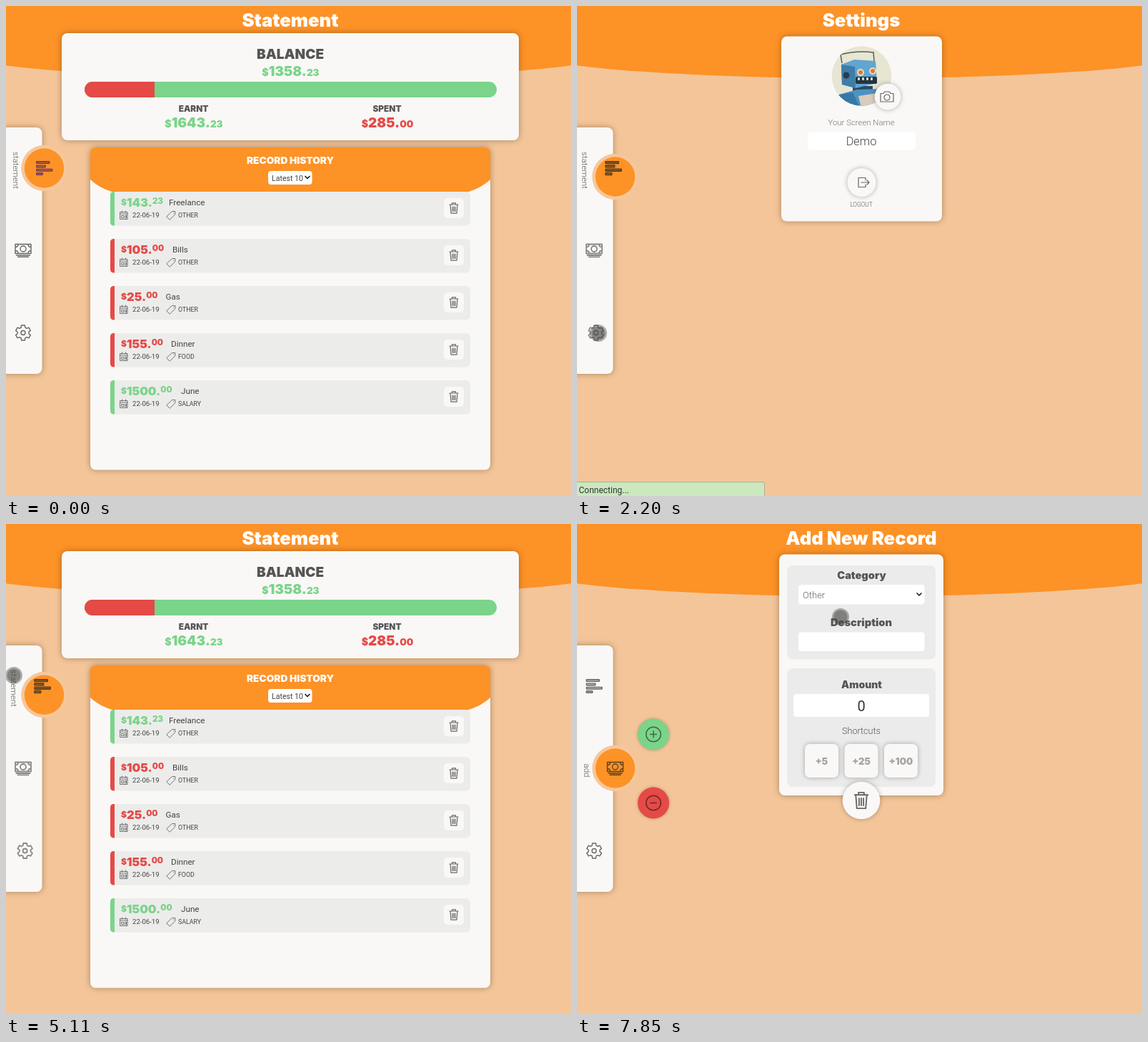
Write an HTML page that moves like this. It is 791 by 686 pixels and loops after 8 s.

```html
<!DOCTYPE html>
<html lang="en">
<head>
<meta charset="utf-8">
<title>Budget tracker</title>
<style>
  html, body { margin: 0; width: 100%; height: 100%; overflow: hidden; background: #f3c599; }
  svg { display: block; width: 791px; height: 686px; font-family: Roboto, "Open Sans", sans-serif; }
  .fat { font-family: Inter, Lato, sans-serif; font-weight: 900; }
  .mid { text-anchor: middle; }
  .thin { font-weight: 300; }
  .card { fill: #f9f8f6; filter: drop-shadow(0 0 4px rgba(80, 50, 20, .45)); }
  .knob { fill: #f9f8f6; filter: drop-shadow(0 0 3px rgba(0, 0, 0, .3)); }
  .line { fill: none; stroke: #666; stroke-width: 1.2; stroke-linejoin: round; stroke-linecap: round; }
</style>
</head>
<body>
<svg id="stage" viewBox="0 0 791 686"></svg>
<script>
const GREEN = '#7ad48a', RED = '#e54a47', ORANGE = '#fd9226', DARK = '#555';
const LOOP = 8000, GLIDE = 663;

const rect = (x, y, w, h, r, fill, cls = '') =>
  `<rect x="${x}" y="${y}" width="${w}" height="${h}" rx="${r}" fill="${fill}" class="${cls}"/>`;
const circle = (x, y, r, fill, cls = '') =>
  `<circle cx="${x}" cy="${y}" r="${r}" fill="${fill}" class="${cls}"/>`;
const text = (x, y, size, fill, str, cls = '') =>
  `<text x="${x}" y="${y}" font-size="${size}" fill="${fill}" class="${cls}">${str}</text>`;
const path = (d, cls = 'line', extra = '') => `<path d="${d}" class="${cls}" ${extra}/>`;
const at = (x, y, body, scale = 1) => `<g transform="translate(${x} ${y}) scale(${scale})">${body}</g>`;
const title = str => text(398, 29, 25.7, '#fff', str, 'fat mid');

// Icons, each centred on 0,0
function gearPath() {
  const pts = [];
  for (let i = 0; i < 6; i++)
    for (const [da, r] of [[-21, 8], [-13, 10.8], [13, 10.8], [21, 8]]) {
      const a = (i * 60 + da) * Math.PI / 180;
      pts.push((r * Math.sin(a)).toFixed(2) + ' ' + (-r * Math.cos(a)).toFixed(2));
    }
  return 'M' + pts.join('L') + 'Z';
}
const ICON = {
  bars: [[-9.2, 18], [-3.9, 12.5], [1.4, 22], [6.7, 8.5]]
    .map(([y, w]) => `<rect x="-10.8" y="${y}" width="${w}" height="2.6" rx=".4" fill="rgba(0,0,0,.25)"/>`).join(''),
  cash: path('M-11-8.5H11V4.5H-11ZM-11-4.5Q-7-4.5-7-8.5M11-4.5Q7-4.5 7-8.5M-11 .5Q-7 .5-7 4.5M11 .5Q7 .5 7 4.5M-9.5 7H9.5M-7.5 9.3H7.5', '') +
    '<circle cy="-2" r="4"/>',
  gear: path(gearPath(), '') + '<circle r="3"/>',
  trash: path('M-6-5H6M-2.5-5V-7.2H2.5V-5M-5-5L-4 7.2H4L5-5M-2-2V4.5M0-2V4.5M2-2V4.5'),
  date: path('M-5-4.5H5V5.5H-5ZM-5-2H5M-2.5-6V-4M2.5-6V-4M-3 .5H0V3.5H-3ZM2 0V4M3.5 0V4', 'line', 'style="stroke-width:.9"'),
  tag: path('M-6 1.5L1.5-5.5H5.8V-1.2L-1.5 6ZM3.5-3.2V-3', 'line', 'style="stroke-width:.9"'),
  camera: path('M-9-4.5H-5L-3.5-7H3.5L5-4.5H9V7H-9Z') + '<circle cy="1" r="4" class="line"/>',
  exit: path('M3-3V-6.5H-7V6.5H3V3M-3 0H8M5-3L8 0L5 3'),
  caret: path('M-3-1.5L0 1.5L3-1.5', 'line', 'style="stroke:#222;stroke-width:1.7"')
};

function amount(x, y, color, whole, cents) {
  return `<text x="${x}" y="${y}" class="fat mid" fill="${color}" font-size="19">` +
    `<tspan font-size="14">$</tspan>${whole}.<tspan font-size="13.5">${cents}</tspan></text>`;
}

function record(i, [whole, cents, name, nameX, kind, color]) {
  const y = 260 + 66 * i;
  return rect(146, y, 504, 47.5, 6, '#ececeb') +
    `<path d="M152 ${y}h-1q-5 0-5 5v37.5q0 5 5 5h1z" fill="${color}"/>` +
    `<text x="161" y="${y + 20.5}" class="fat" fill="${color}" font-size="16.5">` +
    `<tspan font-size="12" dy="-2">$</tspan><tspan dy="2">${whole}.</tspan>` +
    `<tspan font-size="11.5" dy="-4">${cents}</tspan></text>` +
    text(nameX, y + 19.3, 11.7, '#444', name) +
    at(165, y + 33, ICON.date) + text(177, y + 36.3, 9.6, '#444', '22-06-19') +
    at(231, y + 33, ICON.tag) + text(241, y + 36.3, 8.8, '#444', kind) +
    rect(613, y + 9, 28, 28, 5, '#f9f8f6') + at(627, y + 23, ICON.trash);
}

const RECORDS = [
  ['143', '23', 'Freelance', 228, 'OTHER', GREEN],
  ['105', '00', 'Bills', 233, 'OTHER', RED],
  ['25', '00', 'Gas', 223.5, 'OTHER', RED],
  ['155', '00', 'Dinner', 231, 'FOOD', RED],
  ['1500', '00', 'June', 245, 'SALARY', GREEN]
];

const statementPage = title('Statement') +
  rect(78, 38, 640, 150, 8, '', 'card') +
  text(398, 74, 19, DARK, 'BALANCE', 'fat mid') +
  amount(398.5, 98, GREEN, '1358', '23') +
  rect(110, 106, 577, 22, 11, GREEN) +
  path('M208 106H121a11 11 0 0 0 0 22H208Z', '', `fill="${RED}"`) +
  text(262.5, 148, 11.8, DARK, 'EARNT', 'fat mid') + amount(263, 170, GREEN, '1643', '23') +
  text(533.5, 148, 11.8, DARK, 'SPENT', 'fat mid') + amount(534, 170, RED, '285', '00') +
  rect(118, 198, 560, 451.5, 8, '', 'card') +
  path('M118 243V206q0-8 8-8H670q8 0 8 8V243C666 254 650 262 626 264H170C146 262 130 254 118 243Z', '', `fill="${ORANGE}"`) +
  text(398, 221, 13.7, '#fff', 'RECORD HISTORY', 'fat mid') +
  rect(367, 231, 61.5, 19, 4, '#fff') + text(372, 245, 10.6, '#444', 'Latest 10') + at(422, 240, ICON.caret) +
  RECORDS.map((r, i) => record(i, r)).join('');

const robot = '<clipPath id="disc"><circle cx="398.5" cy="98" r="41.8"/></clipPath><g clip-path="url(#disc)">' +
  rect(356, 56, 86, 86, 0, '#e6e6d3') +
  path('M371 80L369 68Q392 62 415 65L416 77', '', 'fill="none" stroke="#5d5d5a" stroke-width="1.5"') +
  path('M386 112H414V121H386Z', '', 'fill="#2b4a60"') +
  path('M363 125L392 117L426 116L442 120V142H376Z', '', 'fill="#4b93c4"') +
  path('M363 125L386 121L396 142H376Z', '', 'fill="#3878a4"') +
  path('M394 126L420 122V142H398Z', '', 'fill="#d8cdbb"') +
  path('M370 82L388 75L418 77L420 108L390 115L371 110Z', '', 'fill="#62a5d0"') +
  path('M370 82L389 85L390 115L371 110Z', '', 'fill="#3f7ca8"') +
  rect(390, 99, 30, 10, 2, '#263340') +
  [393, 399, 405, 411].map(x => rect(x, 100, 3, 4, 1, '#d9dcd4')).join('') +
  [[397, 93], [414, 91]].map(([x, y]) => circle(x, y, 5, '#ecdcc0') + circle(x, y, 3, '#d87938')).join('') +
  circle(377, 97, 4.5, '#2b3b48') + '</g>';

const settingsPage = title('Settings') +
  rect(286, 42.5, 225, 259, 8, '', 'card') + robot +
  circle(435, 127, 18.3, '', 'knob') + at(434, 127, ICON.camera) +
  text(398, 167, 11.4, '#777', 'Your Screen Name', 'mid thin') +
  rect(323, 176.5, 151, 25, 5, '#fff') + text(398, 195, 16.3, '#444', 'Demo', 'mid thin') +
  circle(398.5, 247, 20, '', 'knob') + at(401, 247, ICON.exit) +
  text(398, 281, 8.4, '#555', 'LOGOUT', 'mid thin');

const addPage = title('Add New Record') +
  rect(283, 42.5, 230, 337.5, 8, '', 'card') +
  rect(294, 58, 208, 131.5, 8, '#ebebeb') + rect(294, 202, 208, 166, 8, '#ebebeb') +
  text(398.5, 77, 14.6, DARK, 'Category', 'fat mid') +
  rect(310, 85, 176.5, 27.5, 4, '#fff') + text(316, 104, 13, '#666', 'Other', 'thin') + at(479, 98.5, ICON.caret) +
  text(398, 143, 14.7, DARK, 'Description', 'fat mid') + rect(310, 151.5, 176.5, 26.5, 4, '#fff') +
  text(398.5, 230, 14, DARK, 'Amount', 'fat mid') + rect(303, 238, 190, 32, 4, '#fff') +
  text(398, 262, 20, '#333', '0', 'mid') +
  text(398, 294, 12.6, '#555', 'Shortcuts', 'mid thin') +
  ['+5', '+25', '+100'].map((s, i) => rect(319 + 55.5 * i, 308, 47, 47, 7, '', 'knob') +
    text(342.5 + 55.5 * i, 337, 13, '#a3a3a3', s, 'fat mid')).join('') +
  circle(398, 387, 26.3, '', 'knob') + at(398, 387, ICON.trash, 1.55);

const signButton = (id, color, d) => `<g id="${id}">` + circle(0, 0, 22, color, '') +
  `<g fill="none" stroke="rgba(0,0,0,.5)" stroke-width="1.5"><circle r="10.3"/><path d="${d}"/></g></g>`;

const NAV = [
  { icon: 'bars', label: 'statement', y: 227, textY: 230 },
  { icon: 'cash', label: 'add', y: 342, textY: 345 },
  { icon: 'gear', label: 'settings', y: 457.5, textY: 461 }
];

const stage = document.getElementById('stage');
stage.innerHTML = rect(0, 0, 791, 686, 0, '#f3c599') + rect(0, 0, 791, 70, 0, ORANGE) +
  `<ellipse cx="395.5" cy="60" rx="480" ry="41.2" fill="${ORANGE}"/>` +
  [statementPage, addPage, settingsPage].map((p, i) => `<g id="page${i}">${p}</g>`).join('') +
  '<g id="signs" style="filter:drop-shadow(0 0 2px rgba(80,50,20,.35))">' +
  signButton('plus', GREEN, 'M-5 0H5M0-5V5') + signButton('minus', RED, 'M-5 0H5') + '</g>' +
  rect(-12, 170, 62.5, 345, 8, '', 'card') +
  '<g id="orb">' + circle(53.5, 0, 32.3, '#f6c79c') + circle(53.5, 0, 27.7, ORANGE) + '</g>' +
  NAV.map((n, i) => `<g id="label${i}">${text(0, 0, 11.6, '#555', n.label, 'mid thin')}</g>` +
    `<g id="icon${i}" fill="none" stroke-linejoin="round" stroke-linecap="round">${ICON[n.icon]}</g>`).join('') +
  '<g id="status"><path d="M-2 666.5H259q3.5 0 3.5 3.5V688H-2Z" fill="#cbe8bf" stroke="#a9b48f"/>' +
  text(2.5, 682, 12, '#333', 'Connecting...') + '</g>' +
  '<g id="cursor"><circle r="12"/><circle r="9.5"/></g>';

const el = id => document.getElementById(id);
const show = (id, on) => { el(id).style.display = on ? '' : 'none'; };
const move = (id, x, y, more = '') => el(id).setAttribute('transform', `translate(${x} ${y}) ${more}`);

// [time, cursor x, cursor y]; the cursor stays put where no place is given
const STEPS = [
  [0], [310, 713, 595], [490, 640, 570], [660, 480, 505], [830, 300, 440], [1000, 160, 405], [1170, 95, 391], [1330, 70.5, 402],
  [1510, 48, 440], [1680, 30, 458], [2010], [2200], [2360], [2530], [2700], [2880],
  [3230, 42, 466], [3400, 43, 455], [3570, 40, 400], [3750, 36, 345], [3920, 28, 310], [4090, 26, 289],
  [4430, 11, 212], [4600], [4750], [4930], [5110], [5270], [5460, 11, 225],
  [5630, 13, 260], [5800, 17, 310], [5970, 21, 355],
  [6310, 30, 342], [6480], [6660], [6820], [7000], [7170], [7340, 58, 339],
  [7510, 150, 290], [7680, 285, 195], [7850, 369, 130]
];
// Page changes: press, swap, start of the menu glide, menu items left and entered
const MOVES = [
  { press: 2010, swap: 2200, glide: 2044, from: 0, to: 2 },
  { press: 4600, swap: 4750, glide: 4604, from: 2, to: 0 },
  { press: 6480, swap: 6660, glide: 6438, from: 0, to: 1 }
];

const clamp = u => Math.max(0, Math.min(1, u));
const inOut = (u, n) => u < .5 ? Math.pow(2 * u, n) / 2 : 1 - Math.pow(2 - 2 * u, n) / 2;

function draw(now) {
  let t = 0, x = null, y = null;
  for (const [time, cx, cy] of STEPS) {
    if (time > now) break;
    t = time;
    if (cx !== undefined) { x = cx; y = cy; }
  }

  let page = 0, orbY = NAV[0].y, u = 1, pressed = false, loading = false;
  const active = [1, 0, 0];
  for (const m of MOVES) {
    if (t >= m.press && t < m.swap) pressed = true;
    if (t < m.swap) break;
    page = m.to;
    u = clamp((t - m.glide) / GLIDE);
    const k = inOut(u, 2.3);
    active.fill(0);
    active[m.from] = 1 - k;
    active[m.to] = k;
    orbY = NAV[m.from].y + (NAV[m.to].y - NAV[m.from].y) * inOut(u, 3);
    loading = m.to !== 0 && t < m.swap + 320;
  }

  NAV.forEach((n, i) => {
    show('page' + i, i === page);
    const a = active[i], icon = el('icon' + i);
    move('icon' + i, 24 + 29.5 * a, n.y);
    icon.setAttribute('stroke', a < .5 ? (u < 1 ? '#888' : '#666') : t < 2200 ? '#763760' : '#5b401f');
    icon.setAttribute('stroke-width', u < 1 ? 1.8 : 1.4);
    move('label' + i, 10 - 30 * (1 - a), n.textY, 'rotate(90)');
  });
  move('orb', 0, orbY);

  const open = 1 - Math.pow(1 - u, 3);
  show('signs', page === 1);
  el('signs').style.opacity = .4 + .6 * open;
  move('plus', 28 + 79 * open, 342 - 47.5 * open);
  move('minus', 28 + 79 * open, 342 + 48.5 * open);

  show('status', loading);
  show('cursor', x !== null);
  if (x !== null) move('cursor', x, y);
  const [ring, core] = el('cursor').children;
  ring.setAttribute('fill', pressed ? 'rgba(214,214,70,.65)' : 'rgba(70,70,70,.42)');
  core.setAttribute('fill', pressed ? 'rgba(186,194,45,.75)' : 'rgba(70,70,60,.4)');
}

function tick() {
  draw(performance.now() % LOOP);
  requestAnimationFrame(tick);
}
tick();
</script>
</body>
</html>
```
